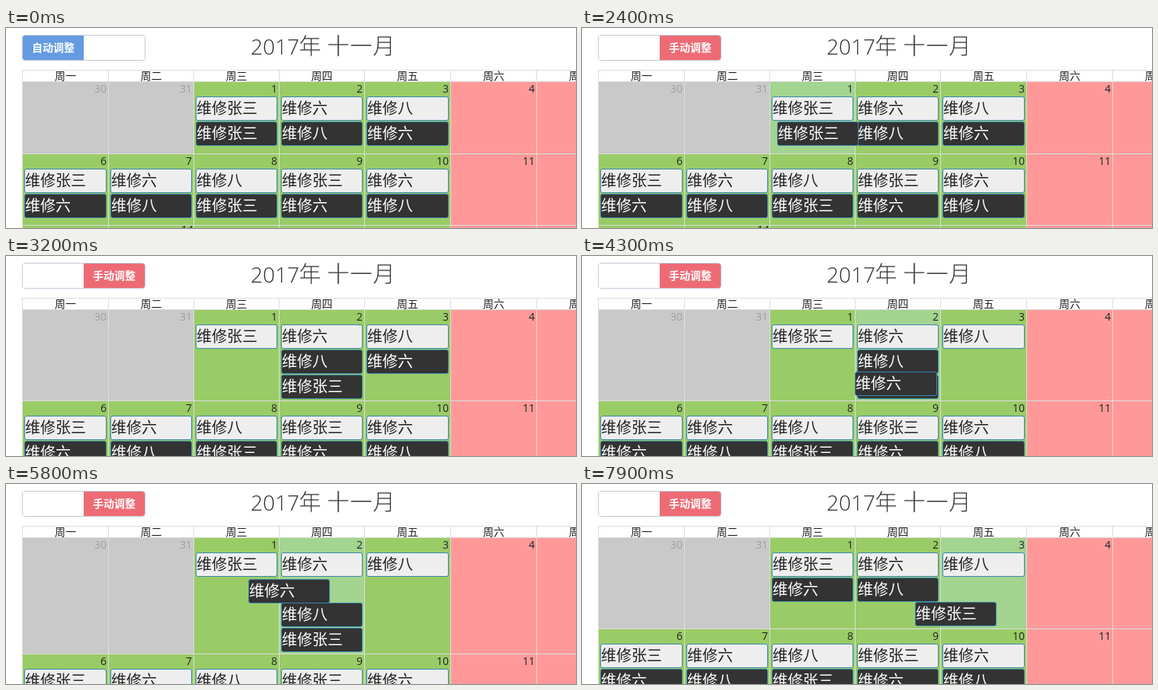
An HTML page for the animation above (8000 ms loop, 748x263 px).

```html
<!DOCTYPE html>
<html lang="zh-CN">
<head>
<meta charset="utf-8">
<style>
  html, body { margin: 0; width: 100%; height: 100%; overflow: hidden; background: #fff; }
  svg { display: block; width: 748px; height: 263px; }
  text { font-family: "Open Sans", "Noto Sans CJK SC", "Noto Sans CJK", sans-serif; font-size: 14px; fill: #222; white-space: pre; }
  .title { font-weight: 300; fill: #333; }
  .zh { font-family: "Noto Sans CJK SC", "Noto Sans CJK", sans-serif; }
  /* the white outline thins the strokes to a light weight */
  .big { font-size: 30px; stroke: #fff; stroke-width: .9px; }
  .year { font-size: 28px; }
  .mid { text-anchor: middle; }
  .end { text-anchor: end; }
  .dim { fill: #a0a0a0; }
  .tile { font-size: 20px; }
  .white { fill: #fff; }
  .bold { font-weight: 700; fill: #fff; }
</style>
</head>
<body>
<svg id="stage" viewBox="0 0 748 263">
  <clipPath id="inner"><rect x="22" y="10" width="160" height="32" rx="3"/></clipPath>
</svg>
<script>
const LOOP = 8000, STEP = 100;
const X = [21, 134, 246, 358, 470, 583, 696, 808];
const ROW = 95, LINE = '#ddd', GREEN = '#99cc66', RED = '#ff9999', GREY = '#c9c9c9';
const stage = document.getElementById('stage');

function add(parent, tag, attrs, content) {
  const el = document.createElementNS('http://www.w3.org/2000/svg', tag);
  for (const k in attrs) el.setAttribute(k, attrs[k]);
  if (content) el.textContent = content;
  return parent.appendChild(el);
}
const rect = (p, x, y, width, height, fill, more) => add(p, 'rect', { x, y, width, height, fill, ...more });
const text = (p, x, y, cls, s) => add(p, 'text', { x, y, class: cls }, s);
const moveTo = (el, x, y) => el.setAttribute('transform', `translate(${x},${y})`);
const tileWidth = col => X[col + 1] - X[col] - 5;

function cells(p, y, fills) {
  fills.forEach((f, i) => rect(p, X[i], y + 1, X[i + 1] - X[i], 200, f));
  rect(p, 21, y, 727, 1, LINE);
  for (const x of X) rect(p, x, y, 1, 200, LINE);
}

function numbers(p, y, days, dimCount = 0) {
  days.forEach((d, i) => text(p, X[i + 1] - 2, y + 15, i < dimCount ? 'end dim' : 'end', d));
}

function tile(p, col, y, name, dark) {
  const g = add(p, 'g', {});
  rect(g, .5, .5, tileWidth(col) - 1, 31, dark ? '#333' : '#eee', { rx: 2.5, stroke: '#3a87ad' });
  text(g, 1, 23, dark ? 'zh tile white' : 'zh tile', '维修' + name);
  moveTo(g, X[col] + 3, y);
  return g;
}

// Switch
rect(stage, 21.5, 9.5, 161, 33, '#fff', { rx: 3.5, stroke: '#c2cad8' });
const slider = add(add(stage, 'g', { 'clip-path': 'url(#inner)' }), 'g', {});
[['#659be0', 22, '自动调整'], ['#fff', 102, ''], ['#ed6b75', 182, '手动调整']].forEach(([fill, x, s]) => {
  rect(slider, x, 10, 80, 32, fill);
  if (s) text(slider, x + 40, 31, 'zh mid bold', s);
});

// Title and weekday header
text(stage, 321, 35, 'title year', '2017');
text(stage, 384, 34, 'title zh big', '年');
text(stage, 421, 34, 'title zh big', '十一月');
rect(stage, 21, 55, 727, 1, LINE);
X.slice(0, 7).forEach((x, i) => {
  rect(stage, x, 55, 1, 16, LINE);
  text(stage, (x + X[i + 1]) / 2 + .5, 68, 'zh mid', '周' + '一二三四五六日'[i]);
});

// First week
const workWeek = [...Array(5).fill(GREEN), RED, RED];
cells(stage, 70, [GREY, GREY, GREEN, GREEN, GREEN, RED, RED]);
const glow = rect(stage, 0, 71, 0, 192, '#a3d490');
numbers(stage, 70, [30, 31, 1, 2, 3, 4, 5], 2);
['张三', '六', '八'].forEach((n, i) => tile(stage, i + 2, 90, n));

// Following weeks, pushed down as the first one grows
const below = add(stage, 'g', {});
cells(below, 165, workWeek);
numbers(below, 165, [6, 7, 8, 9, 10, 11, 12]);
[['张三', '六'], ['六', '八'], ['八', '张三'], ['张三', '六'], ['六', '八']].forEach(([a, b], i) => {
  tile(below, i, 185, a);
  tile(below, i, 218, b, true);
});
cells(below, 259, workWeek);
text(below, 246, 270, 'end', '14');

// Movable tiles
const start = { 2: ['张三'], 3: ['八'], 4: ['六'] };
const movable = {};
for (const col in start) for (const n of start[col]) movable[n] = tile(stage, +col, 123, n, true);

// path: [time, x, y]; enter: time the pointer reaches the new day
const drags = [
  { name: '张三', from: 2, to: 3, slot: 1, enter: 2700, drop: 3200,
    path: [[2400, 256, 123], [2500, 275, 124], [2800, 350, 128], [2900, 359, 128]] },
  { name: '六', from: 4, to: 3, slot: 0, enter: 4100, drop: 4900,
    path: [[4000, 445, 126], [4200, 372, 147], [4300, 358, 152], [4400, 358, 152], [4600, 366, 156]] },
  { name: '六', from: 3, to: 2, slot: 0, enter: 5900, drop: 6400,
    path: [[5800, 318, 125], [5900, 285, 126], [6000, 262, 127], [6100, 252, 127]] },
  { name: '张三', from: 3, to: 4, slot: 0, enter: 7600, drop: LOOP,
    path: [[7500, 390, 156], [7600, 427, 156], [7800, 427, 156], [7900, 437, 155]] }
];

function along(path, t) {
  const i = path.findIndex(p => p[0] > t);
  if (i < 0) return path[path.length - 1].slice(1);
  const [a, b] = [path[i - 1], path[i]], k = (t - a[0]) / (b[0] - a[0]);
  return [1, 2].map(j => Math.round(a[j] + (b[j] - a[j]) * k));
}

// cubic-bezier(.25, .1, .25, 1)
function ease(p) {
  if (p <= 0 || p >= 1) return p <= 0 ? 0 : 1;
  const curve = (u, a, b) => 3 * u * (1 - u) * ((1 - u) * a + u * b) + u ** 3;
  let lo = 0, hi = 1;
  for (let i = 0; i < 20; i++) {
    const m = (lo + hi) / 2;
    if (curve(m, .25, .25) < p) lo = m; else hi = m;
  }
  return curve(lo, .1, 1);
}

function draw(t) {
  moveTo(slider, -80 * ease((t - 950) / 500), 0);

  const lists = { 2: [...start[2]], 3: [...start[3]], 4: [...start[4]] };
  let active = null;
  for (const d of drags) {
    if (t >= d.drop) {
      lists[d.from] = lists[d.from].filter(n => n !== d.name);
      lists[d.to].splice(d.slot, 0, d.name);
    } else if (t >= d.path[0][0]) active = d;
  }

  let most = 0;
  for (const col in lists) {
    most = Math.max(most, lists[col].length);
    lists[col].forEach((n, i) => {
      moveTo(movable[n], X[col] + 3, 123 + 33 * i);
      movable[n].firstChild.setAttribute('width', tileWidth(+col) - 1);
    });
  }
  moveTo(below, 0, Math.max(ROW, 54 + 33 * most) - ROW);

  const hot = active && (t >= active.enter ? active.to : active.from);
  glow.setAttribute('x', active ? X[hot] + 1 : 0);
  glow.setAttribute('width', active ? X[hot + 1] - X[hot] - 1 : 0);
  if (active) {
    const el = movable[active.name];
    if (el !== stage.lastChild) stage.appendChild(el);
    moveTo(el, ...along(active.path, t));
  }
}

let shown = -1, t0 = null;
function tick(now) {
  if (t0 === null) t0 = now;
  const t = Math.floor((now - t0) % LOOP / STEP) * STEP;
  if (t !== shown) draw(shown = t);
  requestAnimationFrame(tick);
}
draw(0);
requestAnimationFrame(tick);
</script>
</body>
</html>
```
